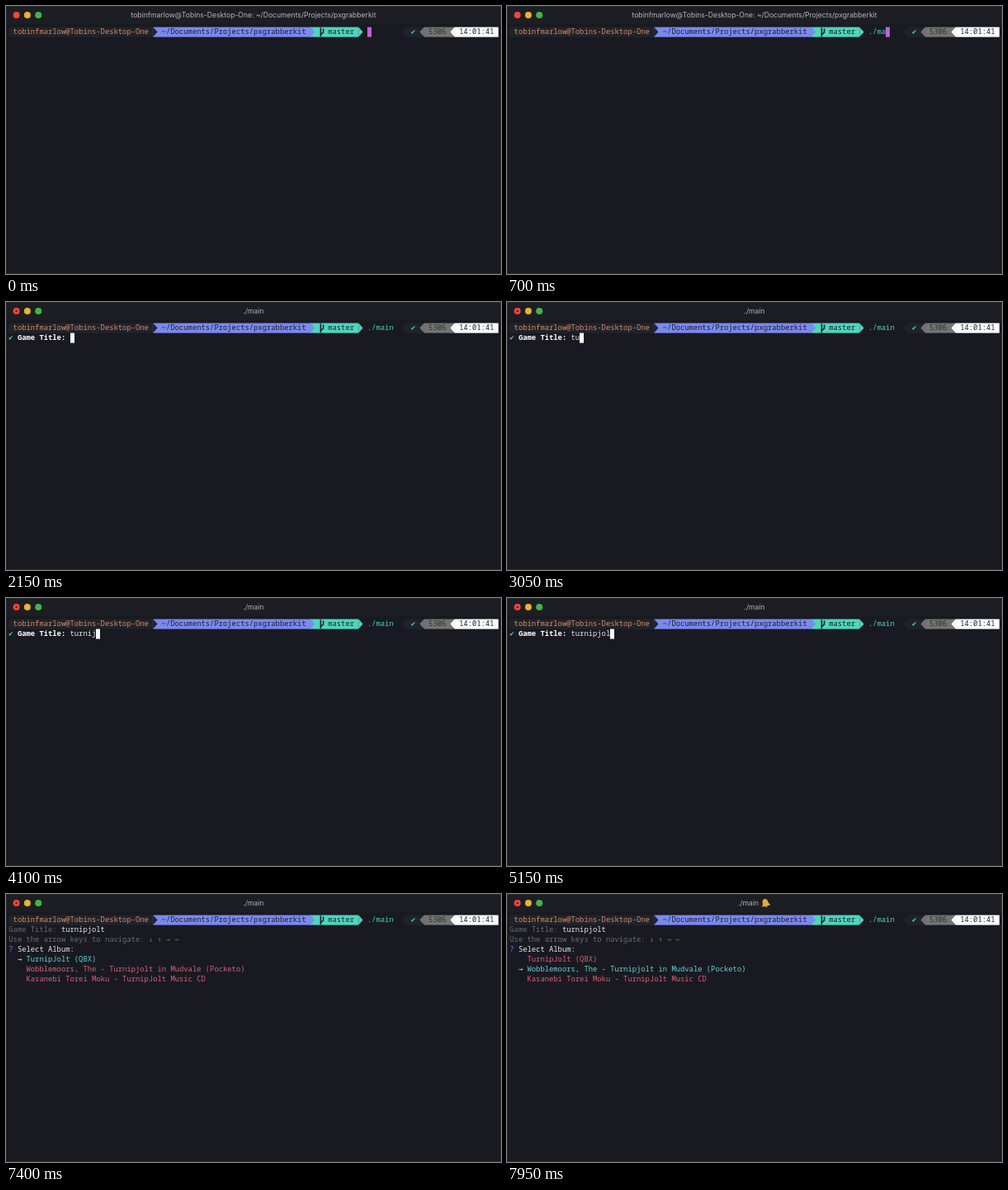
These frames come from a looping animation (600 by 325 pixels, 8 s). An HTML page with a canvas:

```html
<!DOCTYPE html>
<html lang="en">
<head>
<meta charset="utf-8">
<title>Terminal session</title>
<style>
  html, body { margin: 0; width: 100%; height: 100%; overflow: hidden; background: #191a21; }
  canvas { display: block; width: 600px; height: 325px; }
</style>
</head>
<body>
<canvas id="stage"></canvas>
<script>
const W = 600, H = 325, LOOP = 8000;
const X0 = 3.3, CELL = 5.3, TOP = 25.6, ROW = 12, BASELINE = 8.7;
const MONO = '"Noto Sans Mono", "DejaVu Sans Mono", monospace';
const SYMBOLS = '"DejaVu Sans Mono", monospace';
const SANS = 'Inter, Roboto, sans-serif';

const C = {
  body: '#191a21', bar: '#1d1e24', segment: '#21232b', edge: '#2e3036',
  title: '#b4b5b8', orange: '#d58b62', purple: '#7b89f0', teal: '#4fd6be',
  ink: '#1c1f2a', gray: '#747474', dim: '#696b70', white: '#fff', text: '#e4e4e6',
  cursor: '#bc64d8', cyan: '#66cfd6', pink: '#da5f78', blue: '#6c7cf0'
};

const USER = 'tobinfmarlow@Tobins-Desktop-One';
const PATH = '~/Documents/Projects/pxgrabberkit';
const COMMAND = './main';
const GAME = 'turnipjolt';
const ALBUMS = [
  'TurnipJolt (QBX)',
  'Wobblemoors, The - Turnipjolt in Mudvale (Pocketo)',
  'Kasanebi Torei Moku - TurnipJolt Music CD'
];

// Times of the events, in ms
const RUN = 1100, ASK = 1450, SUBMIT = 5900, LIST = 6950, MOVE = 7750;
const COMMAND_KEYS = [250, 370, 490, 610, 730, 850];
const GAME_KEYS = [
  [2700, 't'], [3000, 'u'], [3250, 'r'], [3600, 'n'], [3800, 'i'], [4000, 'j'],
  [4300, '<'], [4500, 'p'], [4700, 'j'], [4900, 'o'], [5100, 'l'], [5300, 't']
];

const canvas = document.getElementById('stage');
const ctx = canvas.getContext('2d');
const dpr = window.devicePixelRatio || 1;
canvas.width = W * dpr;
canvas.height = H * dpr;

const colX = col => X0 + col * CELL;
const rowY = row => TOP + row * ROW;

function rect(x, y, w, h, color) {
  ctx.fillStyle = color;
  ctx.fillRect(x, y, w, h);
}

function disc(x, y, r, color) {
  ctx.fillStyle = color;
  ctx.beginPath();
  ctx.arc(x, y, r, 0, Math.PI * 2);
  ctx.fill();
}

// Terminal text: one glyph per grid cell
function print(col, row, str, color, { bold = false, family = MONO } = {}) {
  ctx.font = `${bold ? 'bold ' : ''}8.83px ${family}`;
  ctx.textAlign = 'left';
  ctx.fillStyle = color;
  [...str].forEach((ch, i) => {
    if (ch !== ' ') ctx.fillText(ch, colX(col + i), rowY(row) + BASELINE);
  });
}

function symbols(col, row, str, color) {
  print(col, row, str, color, { family: SYMBOLS });
}

function block(col, row, color) {
  rect(Math.round(colX(col)), rowY(row), 5, ROW, color);
}

function segment(from, to, color) {
  rect(colX(from), TOP, (to - from) * CELL, ROW, color);
}

function arrowHead(col, dir, color) {
  const base = colX(dir > 0 ? col : col + 1);
  ctx.fillStyle = color;
  ctx.beginPath();
  ctx.moveTo(base, TOP);
  ctx.lineTo(base + dir * CELL, TOP + ROW / 2);
  ctx.lineTo(base, TOP + ROW);
  ctx.fill();
}

function branchIcon(x) {
  ctx.strokeStyle = C.ink;
  ctx.lineWidth = 1.6;
  ctx.beginPath();
  ctx.moveTo(x + 1.8, 26.2);
  ctx.lineTo(x + 1.8, 37);
  ctx.moveTo(x + 1.8, 35);
  ctx.lineTo(x + 5, 32);
  ctx.lineTo(x + 5, 27.5);
  ctx.stroke();
}

function bell(x, y) {
  ctx.save();
  ctx.translate(x, y);
  ctx.rotate(-0.25);
  ctx.scale(1.2, 1.2);
  disc(0, 3.2, 1.3, '#a8752a');
  ctx.fillStyle = '#dfaa42';
  ctx.beginPath();
  ctx.moveTo(-4.4, 3);
  ctx.quadraticCurveTo(-2.8, 1.5, -2.8, -1);
  ctx.bezierCurveTo(-2.6, -5.2, 2.6, -5.2, 2.8, -1);
  ctx.quadraticCurveTo(2.8, 1.5, 4.4, 3);
  ctx.fill();
  ctx.restore();
}

function titleBar(t) {
  rect(0, 0, W, 22, C.bar);
  ['#f2463c', '#eab32f', '#3fb944'].forEach((color, i) => disc(12.6 + i * 13.3, 11, 4, color));
  if (t >= RUN) disc(12.6, 11, 1.3, '#7c1510');

  ctx.font = `8.6px ${SANS}`;
  ctx.textAlign = 'center';
  ctx.fillStyle = C.title;
  const rung = t >= MOVE;
  ctx.fillText(t < RUN ? `${USER}: ${PATH}` : COMMAND, rung ? 292.5 : 300, 14);
  if (rung) bell(313.3, 11);
}

function promptLine() {
  segment(0, 33, C.segment);
  print(1, 0, USER, C.orange);
  segment(33, 69, C.purple);
  arrowHead(33, 1, C.segment);
  print(35, 0, PATH, C.ink);
  segment(69, 80, C.teal);
  arrowHead(69, 1, C.purple);
  branchIcon(colX(71));
  print(73, 0, 'master', C.ink);
  arrowHead(80, 1, C.teal);

  arrowHead(90, -1, C.segment);
  segment(91, 95, C.segment);
  symbols(92, 0, '✔', C.teal);
  arrowHead(94, -1, C.gray);
  segment(95, 102, C.gray);
  print(96, 0, '5306', '#303030');
  arrowHead(101, -1, C.white);
  segment(102, 112, C.white);
  print(103, 0, '14:01:41', C.ink);
}

function typed(t) {
  let str = '';
  for (const [at, key] of GAME_KEYS) {
    if (t < at) break;
    str = key === '<' ? str.slice(0, -1) : str + key;
  }
  return str;
}

function question(t) {
  const answer = typed(t);
  symbols(0, 1, '✔', C.teal);
  print(2, 1, 'Game Title:', C.white, { bold: true });
  print(14, 1, answer, C.text);
  block(14 + answer.length, 1, C.white);
}

function albumList(t) {
  const active = t < MOVE ? 0 : 1;
  print(0, 2, 'Use the arrow keys to navigate:', C.dim);
  symbols(32, 2, '↓ ↑ → ←', C.dim);
  print(0, 3, '?', C.blue);
  print(2, 3, 'Select Album:', C.text);
  symbols(2, 4 + active, '→', C.text);
  ALBUMS.forEach((name, i) => print(4, 4 + i, name, i === active ? C.cyan : C.pink));
}

function draw(t) {
  ctx.setTransform(dpr, 0, 0, dpr, 0, 0);
  rect(0, 0, W, H, C.body);
  titleBar(t);
  promptLine();

  const count = COMMAND_KEYS.filter(at => t >= at).length;
  print(82, 0, COMMAND.slice(0, count), C.teal);

  if (t < RUN) block(82 + count, 0, C.cursor);
  else if (t < ASK) block(0, 1, C.cursor);
  else if (t < SUBMIT) question(t);
  else {
    print(0, 1, 'Game Title:', C.dim);
    print(12, 1, GAME, C.text);
    if (t < LIST) block(0, 2, C.cursor);
    else albumList(t);
  }

  ctx.strokeStyle = C.edge;
  ctx.lineWidth = 1;
  ctx.strokeRect(0, 0, W, H - 0.5);
}

const start = performance.now();
function tick() {
  draw((performance.now() - start) % LOOP);
  requestAnimationFrame(tick);
}
tick();
</script>
</body>
</html>
```
